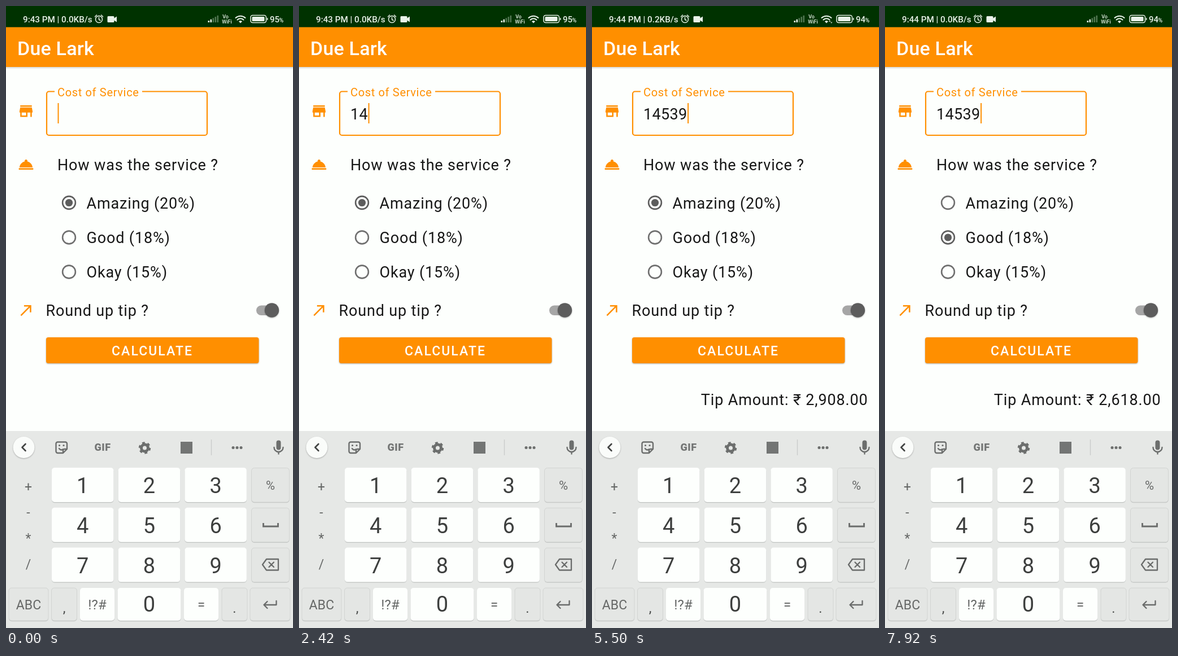
Recreate the animation shown at these times as an HTML page. Size 508x1102 px, loop 8 s.

```html
<!DOCTYPE html>
<html lang="en">
<head>
<meta charset="utf-8">
<title>Due Lark</title>
<style>
  html, body { margin: 0; width: 100%; height: 100%; overflow: hidden; background: #fdfffd; }
  svg { display: block; width: 508px; height: 1102px; font-family: Roboto, "Noto Sans", sans-serif; }
  .body { font-size: 27px; letter-spacing: .84px; fill: #171717; }
  .medium { font-weight: 500; }
  .mid { text-anchor: middle; }
  .white { fill: #fff; }
  .orange { fill: #ff8f00; }
  .line { fill: none; stroke-linecap: round; stroke-linejoin: round; }
  .lift { filter: drop-shadow(0 1px 1px rgba(0,0,0,.28)); }
</style>
</head>
<body>
<svg viewBox="0 0 508 1102" xmlns="http://www.w3.org/2000/svg">
  <defs>
    <clipPath id="btnClip"><rect x="71" y="587" width="376.500" height="46" rx="4"/></clipPath>
    <linearGradient id="barShade" x2="0" y2="1">
      <stop offset="0" stop-opacity=".16"/><stop offset="1" stop-opacity="0"/>
    </linearGradient>
  </defs>
  <rect width="508" height="1102" fill="#fdfffd"/>

  <!-- status bar -->
  <rect width="508" height="38" fill="#003200"/>
  <g fill="#e9f2e9">
    <text id="clock" class="medium" x="30" y="28.500" font-size="15.200"></text>
    <g class="line" stroke="#e9f2e9" stroke-width="1.500">
      <circle cx="164.500" cy="23.500" r="6"/>
      <path d="M164.500 20v4l2.500 1.500M157.500 19l3-3M171.500 19l-3-3"/>
    </g>
    <path d="M181 18h9a1.500 1.500 0 0 1 1.500 1.500v2l4.500-3v10l-4.500-3v2a1.500 1.500 0 0 1-1.500 1.500h-9a1.500 1.500 0 0 1-1.500-1.500v-8a1.500 1.500 0 0 1 1.500-1.500z"/>
    <g id="signal"></g>
    <text class="mid medium" x="388.500" y="21.500" font-size="9">Vo</text>
    <text class="mid medium" x="391" y="30.500" font-size="9">WiFi</text>
    <g class="line" stroke="#e9f2e9" stroke-width="2">
      <path d="M406.500 21a12.500 12.500 0 0 1 17 0M409.500 24.500a8 8 0 0 1 11 0"/>
    </g>
    <path d="M412 27.300a4.500 4.500 0 0 1 6 0l-3 3.200z"/>
    <path id="traffic" d="M419 28l1.800-2.500 1.800 2.500zM422 28.500h3.600l-1.800 2.500z"/>
    <rect x="433" y="16.500" width="27.500" height="13" rx="3.500" fill="none" stroke="#e9f2e9" stroke-width="1.500"/>
    <rect x="435.500" y="19" width="22" height="8" rx="1.500"/>
    <rect x="461.800" y="21" width="1.700" height="4" rx=".8"/>
    <text id="battery" class="medium" x="467" y="28.500" font-size="15"></text>
    <text class="medium" x="483.500" y="28.500" font-size="10.500">%</text>
  </g>

  <!-- app bar -->
  <rect y="108" width="508" height="4" fill="url(#barShade)"/>
  <rect class="orange" y="37.500" width="508" height="70.500"/>
  <text class="white medium" x="20" y="86.500" font-size="34" letter-spacing=".2">Due Lark</text>

  <!-- form -->
  <g class="orange">
    <path transform="translate(20.100 170.900) scale(1.280)" d="M20 4H4v2h16V4zm1 10v-2l-1-5H4l-1 5v2h1v6h10v-6h4v6h2v-6h1zm-9 4H6v-4h6v4z"/>
    <path transform="translate(20.100 265.600) scale(1.280)" d="M2 17h20v2H2zm11.840-9.210c.1-.24.16-.51.16-.79 0-1.100-.9-2-2-2s-2 .9-2 2c0 .28.06.55.16.79C6.250 8.600 3.270 11.930 3 16h18c-.27-4.070-3.250-7.400-7.160-8.210z"/>
    <path transform="translate(20.400 523.600) scale(1.280)" d="M9 5v2h6.590L4 18.590 5.410 20 17 8.410V15h2V5z"/>
    <text x="91" y="160" font-size="20" letter-spacing=".66">Cost of Service</text>
    <rect id="caret" y="172" width="2" height="36"/>
  </g>
  <path d="M86 151.500H76a4 4 0 0 0-4 4v69.500a4 4 0 0 0 4 4h276a4 4 0 0 0 4-4v-69.500a4 4 0 0 0-4-4H241" fill="none" stroke="#ff8f00" stroke-width="2.200"/>
  <text id="cost" x="91" y="200.500" font-size="27" letter-spacing=".35" fill="#171717"></text>
  <g class="body">
    <text x="91" y="291">How was the service ?</text>
    <text x="142.500" y="358.500">Amazing (20%)</text>
    <text x="142.500" y="420">Good (18%)</text>
    <text x="142.500" y="481">Okay (15%)</text>
    <text x="70.500" y="549">Round up tip ?</text>
    <text id="tip" x="488.500" y="707" text-anchor="end"></text>
  </g>
  <g id="radios"></g>
  <rect x="443" y="530.500" width="36" height="17.500" rx="8.750" fill="#a6a6a6"/>
  <circle class="lift" cx="470.500" cy="539" r="12.700" fill="#5d5d5d"/>

  <!-- button -->
  <rect id="btn" class="orange" x="71" y="587" width="376.500" height="46" rx="4"/>
  <g clip-path="url(#btnClip)"><circle id="ripple" class="white" cx="258.500" cy="610"/></g>
  <text class="white medium" x="187" y="619" font-size="23" letter-spacing="2.050">CALCULATE</text>

  <!-- keyboard -->
  <rect y="753" width="508" height="349" fill="#e6e8e6"/>
  <circle class="lift" cx="31.500" cy="782" r="19" fill="#fafcfa"/>
  <g class="line" stroke="#6c6e6d" stroke-width="2.400">
    <path d="M34.500 776l-6 6 6 6" stroke="#414342" stroke-width="2.600"/>
    <path d="M91.500 772.500h13.500a3 3 0 0 1 3 3v9.500l-7 7h-9.500a3 3 0 0 1-3-3v-13.500a3 3 0 0 1 3-3zM101 791.500v-4a2.500 2.500 0 0 1 2.500-2.500h4M94 784q3 4 6.500 1.500"/>
    <path d="M94.500 778.500h.1M102 778.500h.1" stroke-width="3.200"/>
    <circle cx="245.500" cy="783" r="6" stroke-width="5"/>
    <circle cx="245.500" cy="783" r="9" stroke-width="3.500" stroke-dasharray="4.700 4.725" stroke-linecap="butt"/>
    <path d="M402 782.500h.1M409 782.500h.1M416 782.500h.1" stroke-width="5"/>
    <path d="M474.500 782a8 8 0 0 0 16 0M482.500 790v3.500"/>
  </g>
  <rect x="478.500" y="769.500" width="8" height="17" rx="4" fill="#6c6e6d"/>
  <text class="mid" x="171" y="788" font-size="18" font-weight="900" letter-spacing=".5" fill="#737574">GIF</text>
  <rect x="309" y="772" width="21" height="21" fill="#737574"/>
  <path d="M363.500 768v28" stroke="#c9cbca" stroke-width="1.300"/>
  <g id="keys"></g>
  <g class="line" stroke="#6a6c6b" stroke-width="2.300">
    <path d="M455.500 916v6h26v-6" stroke-width="2.800" stroke-linecap="butt" stroke-linejoin="miter"/>
    <path d="M461 980h21v19.500h-21l-7-9.750zM465.500 985.500l8.500 8.500M474 985.500l-8.500 8.500"/>
    <path d="M478.500 1054v7H456.500M462.500 1055l-6 6 6 6"/>
  </g>
</svg>
<script>
const LOOP = 8000;
const $ = id => document.getElementById(id);

function add(parent, tag, attrs, text) {
  const el = document.createElementNS("http://www.w3.org/2000/svg", tag);
  for (const k in attrs) el.setAttribute(k, attrs[k]);
  if (text) el.textContent = text;
  return parent.appendChild(el);
}
const set = (el, attrs) => { for (const k in attrs) el.setAttribute(k, attrs[k]); };

// signal bars
for (let i = 0; i < 5; i++) {
  const h = 3 + i * 2.3;
  add($("signal"), "rect", { x: 357.5 + i * 4, y: 29 - h, width: 2.6, height: h, opacity: i < 2 ? 1 : .35 });
}

// keys
const keyBox = {};
function key(x, y, w, h, label, opt = {}) {
  const { light = false, size = 24, dy = 8, color = "#666867" } = opt;
  add($("keys"), "rect", { x, y: y + 1.2, width: w, height: h, rx: 5, fill: "#bfc2c0" });
  keyBox[label] = add($("keys"), "rect", {
    x, y, width: w, height: h, rx: 5, fill: light ? "#fdfffd" : "#e4e6e4",
    stroke: light ? "none" : "#d2d4d2", "stroke-width": 1
  });
  if (label.length < 4)
    add($("keys"), "text", { class: "mid", x: x + w / 2, y: y + h / 2 + dy, "font-size": size, fill: color }, label);
}
const digit = { light: true, size: 38, dy: 14.5, color: "#3d3f3e" };
for (let n = 0; n < 9; n++)
  key(81 + n % 3 * 117.7, 818 + Math.floor(n / 3) * 70.8, 109.5, 61, String(n + 1), digit);
["%", "space", "delete"].forEach((s, i) => key(434.5, 818.5 + i * 70.8, 67, 60.5, s, { size: 22 }));
key(5, 1031, 70, 58, "ABC", { size: 23, dy: 9 });
key(80.5, 1031, 45, 58, ",", { dy: 15, color: "#4a4c4b" });
key(131, 1031, 61, 58, "!?#", { light: true, dy: 9 });
key(197.5, 1031, 112, 58, "0", { ...digit, dy: 13 });
key(315, 1031, 61, 58, "=", { light: true, dy: 9 });
key(382, 1031, 45, 58, ".", { dy: 15, color: "#4a4c4b" });
key(432, 1031, 71, 58, "enter");
[["+", 860], ["-", 905], ["*", 951], ["/", 997]].forEach(([s, y]) =>
  add($("keys"), "text", { class: "mid", x: 39.5, y, "font-size": 23, fill: "#666867" }, s));

// radio buttons
const radios = [348.5, 410, 471].map(cy => ({
  ring: add($("radios"), "circle", { cx: 111.5, cy, fill: "none" }),
  dot: add($("radios"), "circle", { cx: 111.5, cy, fill: "#5d5d5d" })
}));
function radio(i, width, dot) {
  set(radios[i].ring, { r: 12.7 - width / 2, "stroke-width": width, stroke: dot > 0 ? "#5d5d5d" : "#6f6f6f" });
  radios[i].dot.setAttribute("r", dot);
}

// timeline: [start, value]
const typed = [[0, ""], [1910, "1"], [2075, "14"], [2500, "145"], [2915, "1453"], [3460, "14539"]];
const clock = [[0, "9:43"], [3580, "9:44"]];
const battery = [[0, "95"], [3580, "94"]];
const speed = [[0, "0.0"], [2580, "0.2"], [6500, "0.0"]];
const tip = [[0, ""], [4790, "2,908.00"], [7660, "2,618.00"]];
const presses = [["1", 1825, 1910], ["4", 1990, 2075], ["3", 2745, 2915], ["9", 3250, 3420]];
const taps = [4693, 7540];
const PICK = 6830;

const at = (steps, t) => steps.filter(s => s[0] <= t).pop();
const ramp = (t, a, b) => Math.max(0, Math.min(1, (t - a) / (b - a)));
const smooth = p => p * p * (3 - 2 * p);

function draw(t) {
  const rate = at(speed, t)[1];
  $("clock").textContent = `${at(clock, t)[1]} PM | ${rate}KB/s`;
  $("battery").textContent = at(battery, t)[1];
  $("traffic").setAttribute("opacity", rate === "0.0" ? 0 : .8);

  const [since, cost] = at(typed, t);
  $("cost").textContent = cost;
  const width = cost ? $("cost").getComputedTextLength() : 0;
  set($("caret"), { x: 91.5 + width, opacity: (t - since) % 1000 < 500 ? 1 : 0 });

  for (const [k, a, b] of presses)
    keyBox[k].setAttribute("fill", t >= a && t < b ? "#d3d6d4" : "#fdfffd");

  const amount = at(tip, t)[1];
  $("tip").textContent = amount && "Tip Amount: ₹ " + amount;

  // old choice shrinks into a thick ring, new one fills from the ring
  const p = t - PICK;
  const bump = (a, peak, b) => 2.6 + 2.6 * ramp(p, a, peak) * (1 - ramp(p, peak, b));
  radio(0, bump(120, 240, 400), 6.6 * (1 - smooth(ramp(p, 0, 160))));
  radio(1, bump(0, 90, 220), 6.6 * smooth(ramp(p, 80, 220)));
  radio(2, 2.6, 0);

  const tap = taps.filter(s => s <= t).pop();
  const q = tap === undefined ? 1e4 : t - tap;
  const held = ramp(q, 0, 75) * (1 - ramp(q, 200, 370));
  set($("ripple"), { r: 190 * smooth(ramp(q, 0, 225)), opacity: .18 * held });
  $("btn").style.filter = `drop-shadow(0 ${1 + 1.5 * held}px ${1.2 + 1.8 * held}px rgba(0,0,0,.32))`;
}

const start = performance.now();
function tick() {
  draw((performance.now() - start) % LOOP);
  requestAnimationFrame(tick);
}
tick();
</script>
</body>
</html>
```
